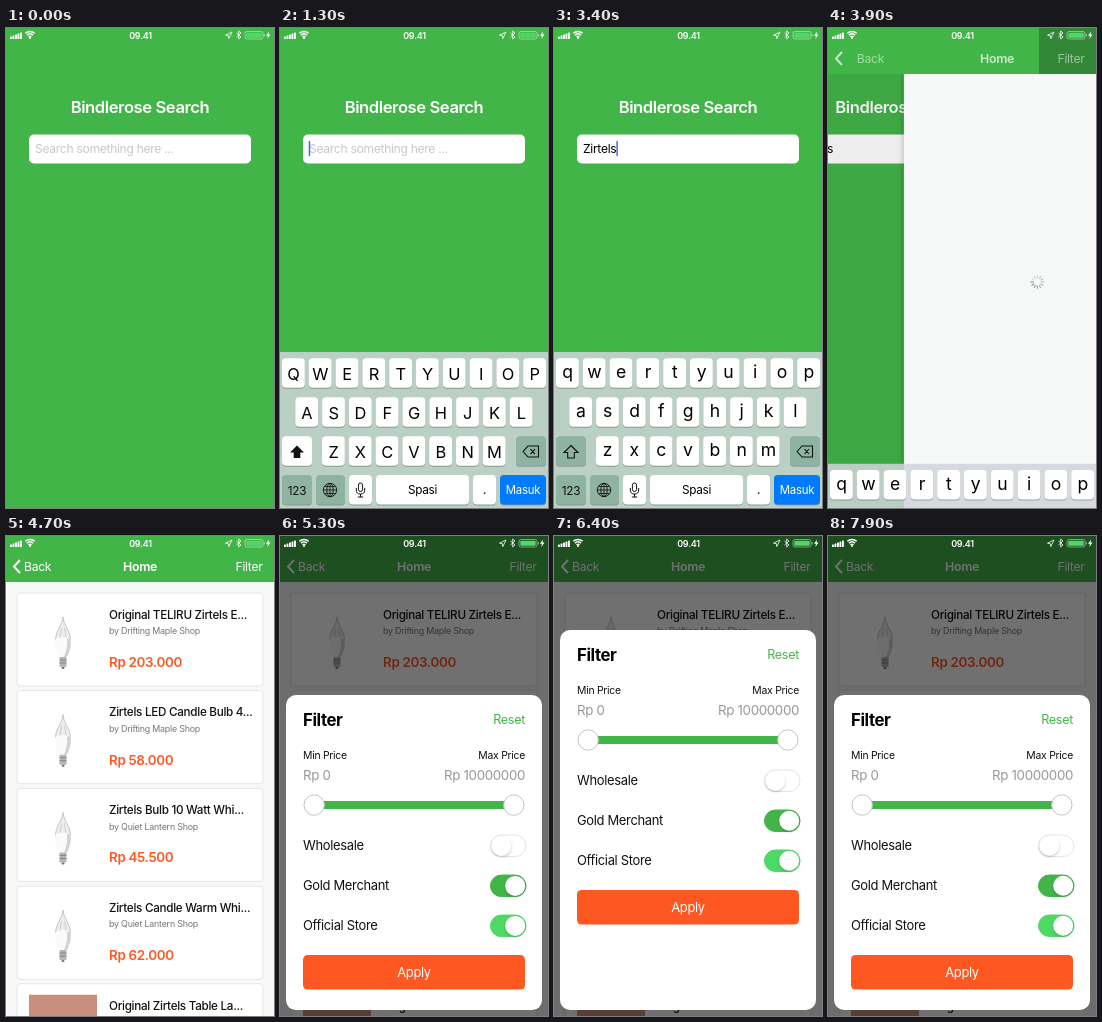
An HTML page with a canvas that plays this animation: 268 by 480 pixels, repeating every 8000 ms.

```html
<!DOCTYPE html>
<html lang="en">
<head>
<meta charset="utf-8">
<title>Shop search</title>
<style>
html, body { margin: 0; width: 100%; height: 100%; overflow: hidden; background: #42b549; }
canvas { display: block; width: 268px; height: 480px; }
</style>
</head>
<body>
<canvas></canvas>
<script>
const W = 268, H = 480, LOOP = 8000;
const GREEN = '#42b549', ORANGE = '#ff5722', WHITE = '#fff', BLACK = '#000';
const QUERY = 'Zirtels';
const TYPED_AT = [1800, 2050, 2270, 2480, 2720, 2950, 3170];
const PUSH = 3761, LOADED = 4300, SHEET = 4700;

const canvas = document.querySelector('canvas');
const scale = Math.max(1, window.devicePixelRatio || 1);
canvas.width = W * scale;
canvas.height = H * scale;
const c = canvas.getContext('2d');

// Critically damped spring from 0 to 1, starting at t0
function spring(t, t0, w = 18) {
  const u = Math.max(0, (t - t0) / 1000 * w);
  return 1 - (1 + u) * Math.exp(-u);
}

function smooth(t, a, b) {
  const x = Math.min(1, Math.max(0, (t - a) / (b - a)));
  return x * x * (3 - 2 * x);
}

function layer(x, y, draw, alpha = 1) {
  c.save();
  c.translate(x, y);
  c.globalAlpha *= alpha;
  draw();
  c.restore();
}

function rect(x, y, w, h, fill, r = 0, line) {
  c.beginPath();
  c.roundRect(x, y, w, h, r);
  c.fillStyle = fill;
  c.fill();
  if (line) stroke(line, 1);
}

function stroke(color, width) {
  c.strokeStyle = color;
  c.lineWidth = width;
  c.stroke();
}

function path(d, color, width) {
  const p = new Path2D(d);
  if (width) {
    c.strokeStyle = color;
    c.lineWidth = width;
    c.stroke(p);
  } else {
    c.fillStyle = color;
    c.fill(p);
  }
}

function disc(x, y, r, fill, line) {
  c.beginPath();
  c.arc(x, y, r, 0, 7);
  c.fillStyle = fill;
  c.fill();
  if (line) stroke(line, 1);
}

function shadow(color, blur, dy) {
  c.shadowColor = color;
  c.shadowBlur = blur * scale;
  c.shadowOffsetY = dy * scale;
}

// y is the middle of the capital letters
function text(s, x, y, size, color, align = 'left', weight = 400) {
  c.font = `${weight} ${size}px Inter, Roboto, sans-serif`;
  c.letterSpacing = -0.025 * size + 'px';
  c.textAlign = align;
  c.fillStyle = color;
  c.fillText(s, x, y + size * 0.36);
}

function statusBar() {
  for (let i = 0; i < 5; i++) rect(4 + i * 2.5, 8.5 - i, 1.9, 2.5 + i, WHITE, 0.5);
  for (const r of [2.2, 4.6, 7]) {
    c.beginPath();
    c.arc(24, 10.5, r, -2.3, -0.84);
    stroke(WHITE, 1.5);
  }
  disc(24, 10, 1, WHITE);
  text('09.41', 134.5, 7.3, 9, WHITE, 'center', 600);
  path('M219.5 7.2L226 4L222.8 10.6L222.3 7.7Z', WHITE, 0.8);
  path('M230.5 5L235 9L232.7 11V3L235 5L230.5 9', WHITE, 0.8);
  path('M241 3.5H255Q257 3.5 257 5.5V9Q257 11 255 11H241Q239 11 239 9V5.5Q239 3.5 241 3.5Z', 'rgba(255,255,255,.55)', 0.8);
  rect(240.3, 4.8, 15.4, 4.9, '#4cd964', 1);
  rect(257.8, 6, 1, 2.6, 'rgba(255,255,255,.55)', 0.5);
  path('M263 3.5L260 7.8H262L261.3 11L264.5 6.6H262.5Z', WHITE);
}

function searchScreen(t) {
  text('Bindlerose Search', 134, 79.5, 16.6, WHITE, 'center', 600);
  rect(23, 106.5, 222, 29, WHITE, 5);
  const count = TYPED_AT.filter(at => t >= at).length;
  const typed = QUERY.slice(0, count);
  if (count) text(typed, 29, 120.5, 12.1, BLACK);
  else text('Search something here ...', 29, 121, 12.1, '#c7c7cd');
  const blinkOff = t > 1500 && t < 1800;
  if (t > 760 && t < PUSH && !blinkOff) {
    const x = count ? 29 + c.measureText(typed).width : 28.7;
    rect(x, 113, 1.5, 15, '#3f6fe0');
  }
}

function key(x, y, w, fill = WHITE) {
  rect(x, y + 1, w, 29.5, 'rgba(70,85,80,.45)', 4);
  rect(x, y, w, 29.5, fill, 4);
}

function keyboard(upper) {
  const dark = '#8fb3a2', ink = '#111';
  rect(0, 324, W, 156, 'rgba(209,213,219,.85)');
  [['qwertyuiop', 2], ['asdfghjkl', 15.3], ['zxcvbnm', 42]].forEach(([row, x0], r) => {
    [...row].forEach((ch, i) => {
      const x = x0 + i * 26.8, y = 330.3 + r * 39;
      key(x, y, 22.8);
      text(upper ? ch.toUpperCase() : ch, x + 11.4, y + (upper ? 15.5 : 13.2), upper ? 16.4 : 17.6, BLACK, 'center');
    });
  });

  key(2, 408.3, 30, upper ? WHITE : dark);
  path('M17 417.5L24 424.5H20.3V430H13.7V424.5H10Z', ink, upper ? 0 : 1.1);
  key(236, 408.3, 30, dark);
  path('M243 423.5L248 418H258.5V429H248ZM250.5 421L255 426M255 421L250.5 426', ink, 1.1);

  key(2, 447, 30, dark);
  text('123', 17, 462.5, 11.8, ink, 'center');
  key(36, 447, 29, dark);
  c.beginPath();
  c.arc(50, 462, 6.7, 0, 7);
  c.moveTo(53.2, 462);
  c.ellipse(50, 462, 3.2, 6.7, 0, 0, 7);
  stroke(ink, 0.9);
  path('M43.3 462H56.7M50 455.3V468.7M44.6 458.5H55.4M44.6 465.5H55.4', ink, 0.8);
  key(69, 447, 23);
  rect(78.4, 455, 4.2, 8.5, WHITE, 2.1, ink);
  path('M76.3 460V462Q76.3 466 80.5 466Q84.7 466 84.7 462V460M80.5 466V469M77.8 469H83.2', ink, 1);
  key(96, 447, 93);
  text('Spasi', 142.5, 462, 11.8, BLACK, 'center');
  key(193, 447, 23);
  text('.', 204.5, 461, 13, BLACK, 'center');
  key(220, 447, 46, '#007aff');
  text('Masuk', 243, 462, 11.4, WHITE, 'center');
}

function bulb() {
  const glass = 'M57 81C57.5 89 64.5 95 64.5 104H49.5C49.5 95 56.5 89 57 81Z';
  path(glass, '#ededed');
  path(glass, '#b8b8b8', 0.8);
  path('M55.5 92L54 102M58.5 92L60 102', '#cfcfcf', 1);
  path('M49.5 103Q57 99 64.5 103Q66 111 61 121H53Q48 111 49.5 103Z', '#fafafa');
  path('M61 103Q64 102 64.5 103Q66 111 61 121H58Q62 112 61 103Z', '#d2d2d2');
  rect(53.5, 121, 7, 10, '#b5b5b5', 1);
  path('M53.5 124H60.5M53.5 127H60.5', '#808080', 0.9);
  rect(55.5, 131, 3, 2, '#777', 1);
}

function card(title, shop, price, swatch) {
  rect(11, 57, 246, 93, WHITE, 3, '#e6e6e6');
  if (swatch) rect(23, 68, 68, 72, swatch);
  else bulb();
  text(title, 103, 78.5, 11.7, '#111', 'left', 500);
  text(shop, 103, 95, 8.9, '#777');
  text(price, 103, 126, 13.4, ORANGE, 'left', 600);
}

function resultsPage(t) {
  layer(0, 0, () => {
    shadow('rgba(0,0,0,.3)', 6, 0);
    rect(0, 46, W, H, '#f7f8f8');
  });
  if (t < LOADED) {
    const step = Math.floor((t - PUSH) / 83) + 5;
    for (let i = 0; i < 12; i++) {
      const a = i * Math.PI / 6, dx = Math.cos(a), dy = Math.sin(a);
      const age = (step - i + 12) % 12;
      c.beginPath();
      c.moveTo(133.5 + dx * 3.6, 254 + dy * 3.6);
      c.lineTo(133.5 + dx * 6.8, 254 + dy * 6.8);
      stroke(`rgba(100,105,105,${0.75 - age * 0.05})`, 1.1);
    }
    return;
  }
  [
    ['Original TELIRU Zirtels E...', 'by Drifting Maple Shop', 'Rp 203.000'],
    ['Zirtels LED Candle Bulb 4...', 'by Drifting Maple Shop', 'Rp 58.000'],
    ['Zirtels Bulb 10 Watt Whi...', 'by Quiet Lantern Shop', 'Rp 45.500'],
    ['Zirtels Candle Warm Whi...', 'by Quiet Lantern Shop', 'Rp 62.000'],
    ['Original Zirtels Table La...', 'by Bright Corner Shop', 'Rp 179.000', '#c98f7c']
  ].forEach((item, i) => layer(0, i * 97.7, () => card(...item)));
}

function navBar(t, p) {
  rect(0, 0, W, 46, GREEN);
  if (t > 3800 && t < 4000) rect(211, 0, 57, 46, 'rgba(0,0,0,.25)');
  layer(0, 0, () => {
    path('M14 24L8 30.5L14 37', WHITE, 2);
    text('Home', 134 + 124 * (1 - p), 30.2, 12.4, WHITE, 'center', 600);
  }, p);
  layer(0, 0, () => {
    text('Back', 18 + 38 * (1 - p), 30.2, 12.2, WHITE);
    text('Filter', 256.5, 30.2, 12.2, WHITE, 'right');
  }, p * p);
}

function toggleRow(label, y, color) {
  text(label, 23, y - 0.5, 12.95, '#111');
  rect(210.5, y - 11, 35.5, 21.5, color || WHITE, 10.75, color || '#e3e3e3');
  layer(0, 0, () => {
    shadow('rgba(0,0,0,.22)', 2.5, 1.2);
    disc(color ? 235.2 : 221.3, y - 0.2, 10, WHITE);
  });
}

function filterSheet(lift) {
  rect(6, 159 - lift, 256, 315 + lift, WHITE, 10);
  layer(0, -lift, () => {
    text('Filter', 23, 183.5, 16.8, BLACK, 'left', 700);
    text('Reset', 245, 183.5, 12.6, GREEN, 'right');
    text('Min Price', 23, 219.5, 10.4, '#111');
    text('Max Price', 245, 219.5, 10.4, '#111', 'right');
    text('Rp 0', 23, 239.2, 13.3, '#999');
    text('Rp 10000000', 245, 239.2, 13.3, '#999', 'right');
    rect(34, 265, 200, 8, GREEN);
    disc(34.2, 269, 10.2, WHITE, '#c4c4c4');
    disc(233.8, 269, 10.2, WHITE, '#c4c4c4');
    toggleRow('Wholesale', 310);
    toggleRow('Gold Merchant', 350, GREEN);
    toggleRow('Official Store', 390, '#4cd964');
    rect(23, 419, 222, 34.5, ORANGE, 4.5);
    text('Apply', 134, 436.2, 12.9, WHITE, 'center');
  });
}

function draw(t) {
  c.setTransform(scale, 0, 0, scale, 0, 0);
  rect(0, 0, W, H, GREEN);
  const push = spring(t, PUSH);
  if (push < 0.999) layer(-80 * push, 0, () => searchScreen(t));
  if (push > 0) {
    rect(0, 0, W, H, `rgba(0,0,0,${0.1 * push})`);
    layer(W * (1 - push), 0, () => resultsPage(t));
    navBar(t, push);
  }

  const shown = spring(t, 620) - push;
  if (shown > 0.001) {
    layer(0, 156 * (1 - shown), () => keyboard(t < TYPED_AT[0]));
  }

  const open = spring(t, SHEET);
  if (open > 0) {
    rect(0, 0, W, H, `rgba(0,0,0,${0.56 * open})`);
    const lift = 65 * (smooth(t, 5700, 6350) - spring(t, 6550, 14));
    layer(0, 321 * (1 - open), () => filterSheet(lift));
  }
  statusBar();
}

const start = performance.now();
function frame() {
  draw((performance.now() - start) % LOOP);
  requestAnimationFrame(frame);
}
frame();
</script>
</body>
</html>
```
